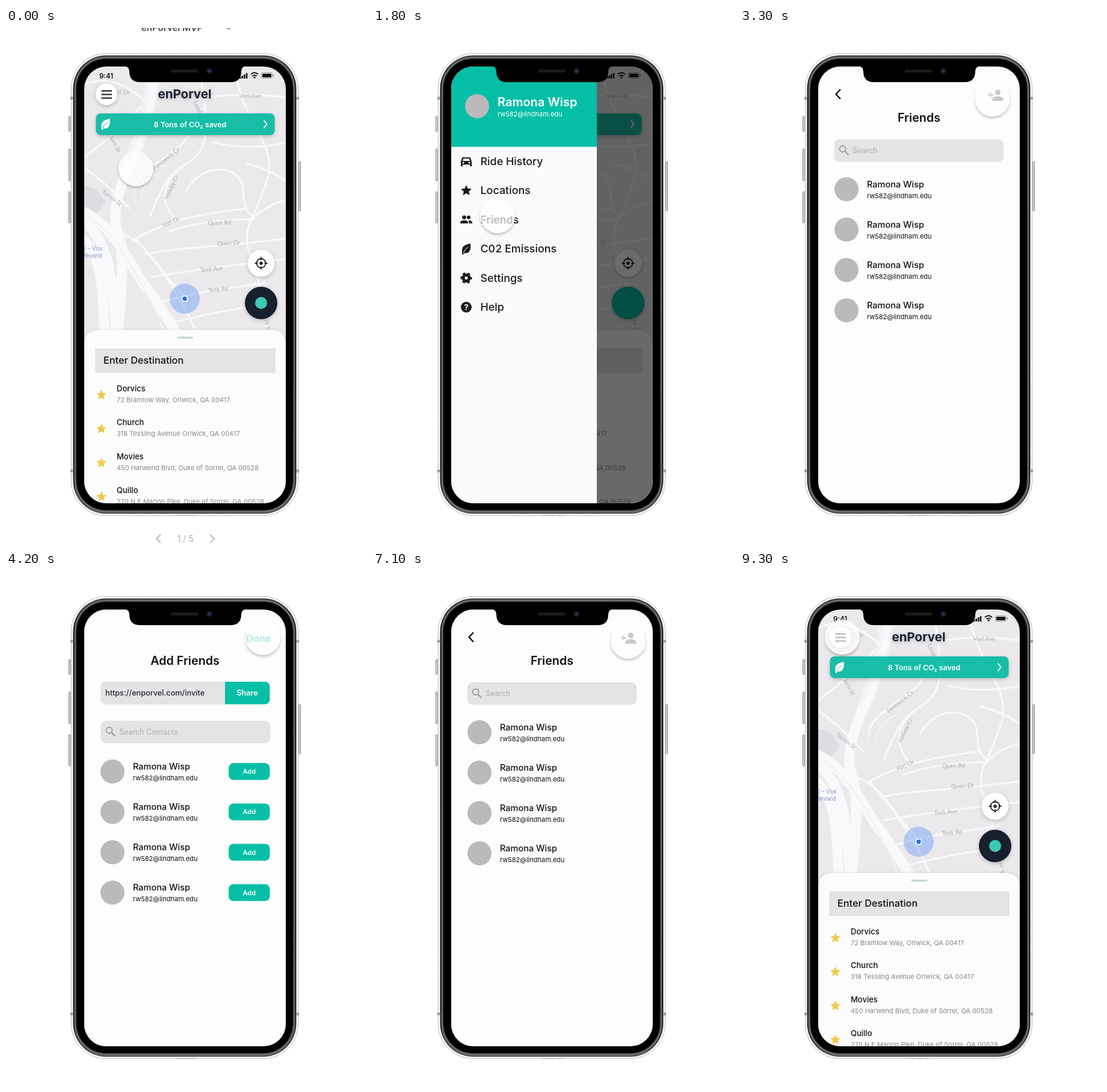
These frames come from a looping animation (600x856 px, 9400 ms). An HTML page:

```html
<!DOCTYPE html>
<html lang="en">
<head>
<meta charset="utf-8">
<title>Ride app walkthrough</title>
<style>
html, body { margin: 0; width: 100%; height: 100%; overflow: hidden; background: #fff; }
svg { display: block; width: 100vw; height: 100vh; font-family: Inter, Roboto, sans-serif; }
.lift { filter: drop-shadow(0 2px 3px rgba(0, 0, 0, .22)); }
.street text { font: 500 10px Lato, sans-serif; fill: #b3b1b6; text-anchor: middle; }
.road path { fill: none; stroke: #f8f9fa; stroke-linecap: round; }
</style>
</head>
<body>
<svg id="stage" viewBox="0 0 600 856"></svg>
<script>
const TEAL = '#04bfa6', FIELD = '#e5e3e6', GREY = '#bbb9bc', PAPER = '#fdfdfd';
const BRAND = 'enPorvel', PERSON = 'Ramona Wisp', EMAIL = 'rw582@lindham.edu';
const LOOP = 9400, STEP = 100, SCREEN_W = 335, PARALLAX = 84;

const text = (x, y, size, weight, fill, str, more = '') =>
  `<text x="${x}" y="${y}" font-size="${size}" font-weight="${weight}" fill="${fill}" ${more}>${str}</text>`;
const middle = 'text-anchor="middle"';
const rect = (x, y, w, h, r, fill, more = '') =>
  `<rect x="${x}" y="${y}" width="${w}" height="${h}" rx="${r}" fill="${fill}" ${more}/>`;
const circle = (x, y, r, fill, more = '') => `<circle cx="${x}" cy="${y}" r="${r}" fill="${fill}" ${more}/>`;
const line = (d, color, width, more = '') =>
  `<path d="${d}" fill="none" stroke="${color}" stroke-width="${width}" ${more}/>`;
const at = (x, y, body) => `<g transform="translate(${x} ${y})">${body}</g>`;
const list = (n, make) => Array.from({ length: n }, (_, i) => make(i)).join('');

function star(r, fill) {
  const points = list(10, i => {
    const a = i * Math.PI / 5, d = i % 2 ? r * .45 : r;
    return `${(d * Math.sin(a)).toFixed(2)},${(-d * Math.cos(a)).toFixed(2)} `;
  });
  return `<polygon points="${points}" fill="${fill}" stroke="${fill}" stroke-width="1.2" stroke-linejoin="round"/>`;
}
const leaf = (fill, vein) =>
  `<path d="M-7 3C-8 -5 0 -8 7 -9C8 1 6 8 -3 7L-6 10L-7 8Z" fill="${fill}"/>` + line('M-5 7Q-3 1 3 -3', vein, 1);
const magnifier = color => circle(-2, -2, 5, 'none', `stroke="${color}" stroke-width="2"`) +
  line('M2 2L8 8', color, 2.4);

function map() {
  const wide = ['M246 60Q243 140 207 222T186 340T184 520', 'M126 304C190 335 205 400 240 440T292 520',
    'M126 318C170 350 180 420 183 520', 'M126 350C160 375 162 440 164 520'];
  const roads = ['M130 232Q170 260 205 300', 'M215 350C260 325 300 312 398 300',
    'M282 318C250 285 264 248 302 224S338 165 320 60', 'M240 312C252 285 262 250 290 232',
    'M215 262C232 225 290 210 308 172', 'M300 270C330 218 392 230 394 268S400 300 412 318',
    'M272 338Q330 318 412 318', 'M232 376C300 362 350 366 470 349', 'M240 414C300 405 380 392 470 384',
    'M256 456C310 440 360 434 430 424', 'M276 490Q350 470 420 462', 'M382 60C380 140 452 190 435 250S390 330 404 372S430 440 434 520',
    'M320 118Q390 105 470 116', 'M408 318Q438 290 470 286', 'M345 190Q400 205 470 190',
    'M215 350C250 390 290 440 318 510', 'M185 340C235 352 250 400 300 450', 'M400 225Q440 235 470 258',
    'M130 95Q180 70 240 130', 'M130 215Q190 170 225 130'];
  const thin = ['M215 290C205 260 235 225 268 230', 'M225 290C222 262 245 244 262 238',
    'M130 330C200 355 235 430 268 520', 'M234 60Q232 140 195 222', 'M256 70Q250 145 215 230'];
  const labels = [['el Dr', 195, 110, 4], ['Vorl Ave', 406, 116, 0], ['Lomb', 316, 134, 68], ['Jorn St', 178, 194, 62],
    ['Fenswick Cr', 268, 220, -38], ['Halvey Cr', 278, 266, -65], ['Torvin St', 174, 285, 37], ['Vorl Dr', 275, 326, -22],
    ['Quen Rd', 355, 327, -2], ['Quen Dr', 370, 361, -3], ['Tesk Ave', 342, 404, -5], ['Tesk Rd', 353, 438, -5], ['ek St', 431, 495, 85]];
  const strokes = (paths, w) => paths.map(d => `<path d="${d}" stroke-width="${w}"/>`).join('');
  return rect(130, 64, SCREEN_W, 726, 0, '#ebe9ec') +
    '<path d="M130 262L150 268L166 290L152 308L130 298Z" fill="#dcdde1"/>' +
    `<g class="road">${strokes(wide, 17)}${strokes(roads, 3.2)}${strokes(thin, 1.3)}</g>` +
    line('M130 311C190 340 220 420 276 520M241 60Q238 140 202 222', '#ecebee', 1.2) +
    `<g class="street">${labels.map(([s, x, y, a]) =>
      `<text transform="translate(${x} ${y}) rotate(${a})">${s}</text>`).join('')}</g>` +
    text(130, 370, 10, 500, '#98a5d2', 'l – Vox') + text(130, 382, 10, 500, '#98a5d2', 'levard');
}

function statusBar() {
  return text(155, 84, 11.5, 600, '#111', '9:41') +
    list(4, i => rect(388 + i * 3.6, 81 - i * 2, 2.5, 3 + i * 2, .6, '#111')) +
    line('M407 77Q413 71.5 419 77M409.5 80Q413 77 416.5 80', '#111', 1.8) + circle(413, 82.3, 1.5, '#111') +
    rect(424.5, 74.5, 18, 9, 2.5, 'none', 'stroke="#777" stroke-width=".8"') +
    rect(426, 76, 15, 6, 1.3, '#111') + rect(443.5, 77.5, 1.4, 3, .5, '#777');
}

function home() {
  const places = [['Dorvics', '72 Bramlow Way, Orlwick, QA 00417'], ['Church', '318 Tessling Avenue Orlwick, QA 00417'],
    ['Movies', '450 Harwend Blvd, Duke of Sorrel, QA 00528'], ['Quillo', '270 N E Marlop Pike, Duke of Sorrel, QA 00528']];
  return map() + statusBar() +
    circle(167, 110, 18, '#fff', 'class="lift"') + line('M158.5 104.5h17.5m-17.5 6h17.5m-17.5 6h17.5', '#111', 2) +
    text(297, 117, 20.5, 700, '#1b2331', BRAND, middle + ' class="lift"') +
    rect(149.5, 142, 297, 36, 8, '#18bda8', 'class="lift"') + at(165.5, 160, leaf('#fff', '#18bda8')) +
    text(306, 164.5, 12.3, 600, '#fff', '8 Tons of CO₂ saved', middle) +
    line('M428.5 153.5L433.5 160L428.5 166.5', '#fff', 1.8) +
    circle(297, 450, 25, '#6f9ff2', 'opacity=".48"') + circle(297, 450, 5.5, '#fff') + circle(297, 450, 3.7, '#226cf0') +
    circle(424, 391, 22.5, '#fff', 'class="lift"') +
    circle(424, 391, 7.5, 'none', 'stroke="#222" stroke-width="1.8"') + circle(424, 391, 2.8, '#222') +
    line('M424 380.5v5m0 11v5M413.5 391h5m11 0h5', '#222', 1.8) +
    circle(424, 457, 27, '#17202c', 'class="lift"') + circle(424, 457, 10, '#3bc9b5') +
    circle(424, 457, 27, TEAL, 'id="activeButton"') +
    '<path d="M130 790V526Q130 502 154 502H441Q465 502 465 526V790Z" fill="#fcfcfd" class="lift"/>' +
    rect(284.5, 513, 27, 3.2, 1.6, '#c7d5d9') + rect(148, 532.5, 300, 41, 0, FIELD) +
    text(162, 558, 16.3, 500, '#111', 'Enter Destination') +
    places.map(([name, address], i) => at(0, i * 56.4, at(158.5, 610, star(7.6, '#efc94c')) +
      text(184, 604, 13, 500, '#111', name) + text(184, 622, 11, 400, '#89878b', address))).join('');
}

function drawer() {
  const ink = '#1b1b1d', white = '#fbfafb';
  const icons = [
    `<path d="M-9 8V0L-6.5 -7H6.5L9 0V8H6V5H-6V8Z" fill="${ink}"/><path d="M-6 -1H6L4.5 -5H-4.5Z" fill="${white}"/>` +
      circle(-5, 2, 1.5, white) + circle(5, 2, 1.5, white),
    star(8.2, ink),
    circle(-3.5, -4, 3.3, ink) + circle(4, -4, 3, ink) +
      `<path d="M-10 6V4Q-9 1 -3.5 1T3 4V6ZM4.5 6V3L3.5 1Q9 1 10 4V6Z" fill="${ink}"/>`,
    leaf(ink, white),
    circle(0, 0, 5, 'none', `stroke="${ink}" stroke-width="5"`) +
      circle(0, 0, 8, 'none', `stroke="${ink}" stroke-width="3" stroke-dasharray="4.2 4.178" stroke-dashoffset="2"`),
    circle(0, 0, 9, ink) + text(0, 4.8, 13.5, 700, white, '?', middle)];
  const names = ['Ride History', 'Locations', 'Friends', 'C02 Emissions', 'Settings', 'Help'];
  return rect(130, 64, 242, 726, 0, white) + rect(130, 64, 242, 133.5, 0, TEAL) + circle(173, 130, 20, GREY) +
    text(207, 129.5, 20, 600, '#fff', PERSON) + text(207, 147, 11, 400, '#fff', EMAIL) +
    names.map((name, i) => at(0, i * 48.4, at(155, 222, icons[i]) + text(178.5, 228, 17.9, 500, ink, name))).join('');
}

const contact = (y, extra = '') => at(0, y, circle(177, 0, 20, GREY) +
  text(211, -3.3, 14.5, 500, '#111', PERSON) + text(211, 14.7, 11, 400, '#111', EMAIL) + extra);
const searchField = (x, y, hint) => rect(x, y, 282, 37.5, 9, FIELD) +
  at(x + 16, y + 18, magnifier('#a19fa3')) + text(x + 30.5, y + 23.1, 12.5, 400, '#aeacb0', hint);
const sheet = title => rect(130, 64, SCREEN_W, 726, 0, PAPER) + text(297.5, 155.5, 19.7, 600, '#111', title, middle);

function friends() {
  return sheet('Friends') + line('M167 102L159.5 110L167 118', '#111', 2.3) +
    line('M412 111h9m-4.5 -4.5v9', '#555', 2) + circle(428.5, 107, 4.6, '#555') +
    '<path d="M419.5 121V118Q421 113.5 428.5 113.5T437.5 118V121Z" fill="#555"/>' +
    searchField(156.5, 185, 'Search') + list(4, i => contact(268 + i * 67.1));
}

const pill = (fill, ink, label) => rect(370, -14, 68.5, 28, 8, fill) + text(404.3, 4, 11, 600, ink, label, middle);

function addFriends() {
  return sheet('Add Friends') + text(399, 118, 16.5, 600, TEAL, 'Done') +
    `<path d="M364 184H166Q157 184 157 193V212.5Q157 221.5 166 221.5H364Z" fill="${FIELD}"/>` +
    `<path d="M364 184H429.5Q438.5 184 438.5 193V212.5Q438.5 221.5 429.5 221.5H364Z" fill="${TEAL}"/>` +
    text(165, 207.3, 12.7, 500, '#26282e', `https://${BRAND.toLowerCase()}.com/invite`) +
    text(401, 207.3, 12.7, 600, '#fff', 'Share', middle) + searchField(157.5, 248.7, 'Search Contacts') +
    list(4, i => contact(333.3 + i * 67.1, pill(TEAL, '#fff', 'Add'))) +
    `<g id="added">${at(0, 333.3, pill('#c2c0c3', '#8b898c', 'Added'))}</g>`;
}

function phoneBody() {
  const button = (x, y, h) => rect(x, y, 2.5, h, 1, '#f2f2f2', 'stroke="#555" stroke-width=".8"');
  const band = (x, y) => rect(x, y, 5, 4.5, 0, '#9a9a9a');
  const shell = (inset, fill, more) =>
    rect(108.5 + inset, 42.5 + inset, 377 - 2 * inset, 768 - 2 * inset, 58 - inset, fill, more);
  return button(104.5, 147, 25) + button(104.5, 201, 53) + button(104.5, 272, 52) + button(487, 222, 82) +
    shell(0, '#fdfdfd', 'stroke="#777" stroke-width=".8" stroke-dasharray="2 1"') +
    shell(3, 'url(#metal)') + shell(6.5, 'none', 'stroke="#6c6e70" stroke-width="2.4"') + shell(9, '#000') +
    band(107, 114.5) + band(482, 114.5) + band(107, 734) + band(482, 734) +
    line('M282 810.5H315', '#777', 1, 'stroke-dasharray="2 2"');
}
const notch = '<path d="M196 63Q205 64 205 72Q205 90 223 90H373Q391 90 391 72Q391 64 400 63Z"/>' +
  rect(274, 69, 46, 5, 2.5, '#1b1b1d') + circle(338, 71.5, 5, '#131a26') + circle(338, 71.5, 2.2, '#26405f');
const shade = id => rect(130, 64, SCREEN_W, 726, 0, '#000', `id="${id}" opacity="0"`);

document.getElementById('stage').innerHTML = `
  <defs>
    <clipPath id="glass"><rect x="130" y="64" width="335" height="726" rx="37"/></clipPath>
    <linearGradient id="metal" x1="0" y1="0" x2="0" y2="1">
      <stop offset="0" stop-color="#3c3d3e"/><stop offset=".1" stop-color="#161718"/>
      <stop offset=".9" stop-color="#1a1b1c"/><stop offset="1" stop-color="#505254"/>
    </linearGradient>
    <mask id="outside" maskUnits="userSpaceOnUse" x="-50" y="-50" width="100" height="100">
      <rect x="-50" y="-50" width="100" height="100" fill="#fff"/>${circle(0, 0, 28, '#000')}
    </mask>
  </defs>
  <rect width="600" height="856" fill="#fff"/>
  <g id="chrome">
    <g id="heading">${text(225, 5, 15, 600, '#444', BRAND + ' MVP')}${line('M366 -1l4 3l4 -3', '#777', 1.2)}</g>
    <g id="pager">${text(298, 854, 14, 400, '#aaa', '1 / 5', middle)}
      ${line('M257 842L250 849L257 856M339 842L346 849L339 856', '#999', 1.3)}</g>
  </g>
  ${phoneBody()}
  <g clip-path="url(#glass)">
    <g id="base">${home()}${shade('scrim')}<g id="drawer">${drawer()}</g></g>
    ${shade('baseDim')}
    <g id="friends">${friends()}</g>
    ${shade('friendsDim')}
    <g id="adding">${addFriends()}</g>
  </g>
  ${notch}
  <g id="cursor">
    <g mask="url(#outside)">${circle(0, 3, 28, '#000', 'opacity=".3" style="filter:blur(2.5px)"')}</g>
    ${circle(0, 0, 28, '#fff', 'fill-opacity=".68" stroke="#fff" stroke-opacity=".85" stroke-width="2"')}
  </g>`;

const part = {};
document.querySelectorAll('#stage [id]').forEach(el => part[el.id] = el);
const clamp = v => Math.max(0, Math.min(1, v));
const easeOut = (t, start, length = 300) => 1 - (1 - clamp((t - start) / length)) ** 1.68;
const move = (el, x, y = 0) => el.setAttribute('transform', `translate(${x} ${y})`);
const fade = (el, opacity) => el.setAttribute('opacity', opacity);

// time, x, y, sideways bow on the way to the next stop
const stops = [[0, 216, 234, 0], [700, 165, 110, 0], [1250, 165, 110, 0], [1900, 210, 326, 0], [2500, 210, 326, 0],
  [3400, 427, 111, 0], [4250, 427, 111, 0], [5000, 404, 333, 0], [5580, 404, 333, 18], [6270, 424, 115, 0],
  [7100, 424, 117, 0], [7350, 424, 117, 0], [8200, 165, 110, 0], [8700, 165, 110, 0], [9300, 170, 110, 0], [LOOP, 170, 110, 0]];

function cursorAt(t) {
  const i = stops.findIndex((s, k) => t < stops[k + 1][0]);
  const [t0, x0, y0, bow] = stops[i], [t1, x1, y1] = stops[i + 1];
  const u = (t - t0) / (t1 - t0), s = u * u * (3 - 2 * u);
  return [x0 + (x1 - x0) * s + bow * Math.sin(Math.PI * u), y0 + (y1 - y0) * s];
}

function draw(t) {
  const menu = t < 3000 ? easeOut(t, 1000) : 0;
  const friendsIn = easeOut(t, 2150) - easeOut(t, 8480);
  const addIn = easeOut(t, 3780) - easeOut(t, 6450);
  fade(part.activeButton, menu);
  fade(part.scrim, .58 * menu);
  fade(part.drawer, menu);
  move(part.base, -PARALLAX * friendsIn);
  fade(part.baseDim, .58 * friendsIn);
  move(part.friends, SCREEN_W * (1 - friendsIn) - PARALLAX * addIn);
  fade(part.friendsDim, .58 * addIn);
  move(part.adding, SCREEN_W * (1 - addIn));
  fade(part.added, easeOut(t, 5300, 200));
  const leave = clamp(t / 200);
  fade(part.chrome, 1 - leave);
  move(part.heading, 0, -12 * leave);
  move(part.pager, 0, 12 * leave);
  move(part.cursor, ...cursorAt(t));
}

const begin = performance.now();
function tick() {
  const t = (performance.now() - begin) % LOOP;
  draw(Math.floor(t / STEP) * STEP);
  requestAnimationFrame(tick);
}
tick();
</script>
</body>
</html>
```
